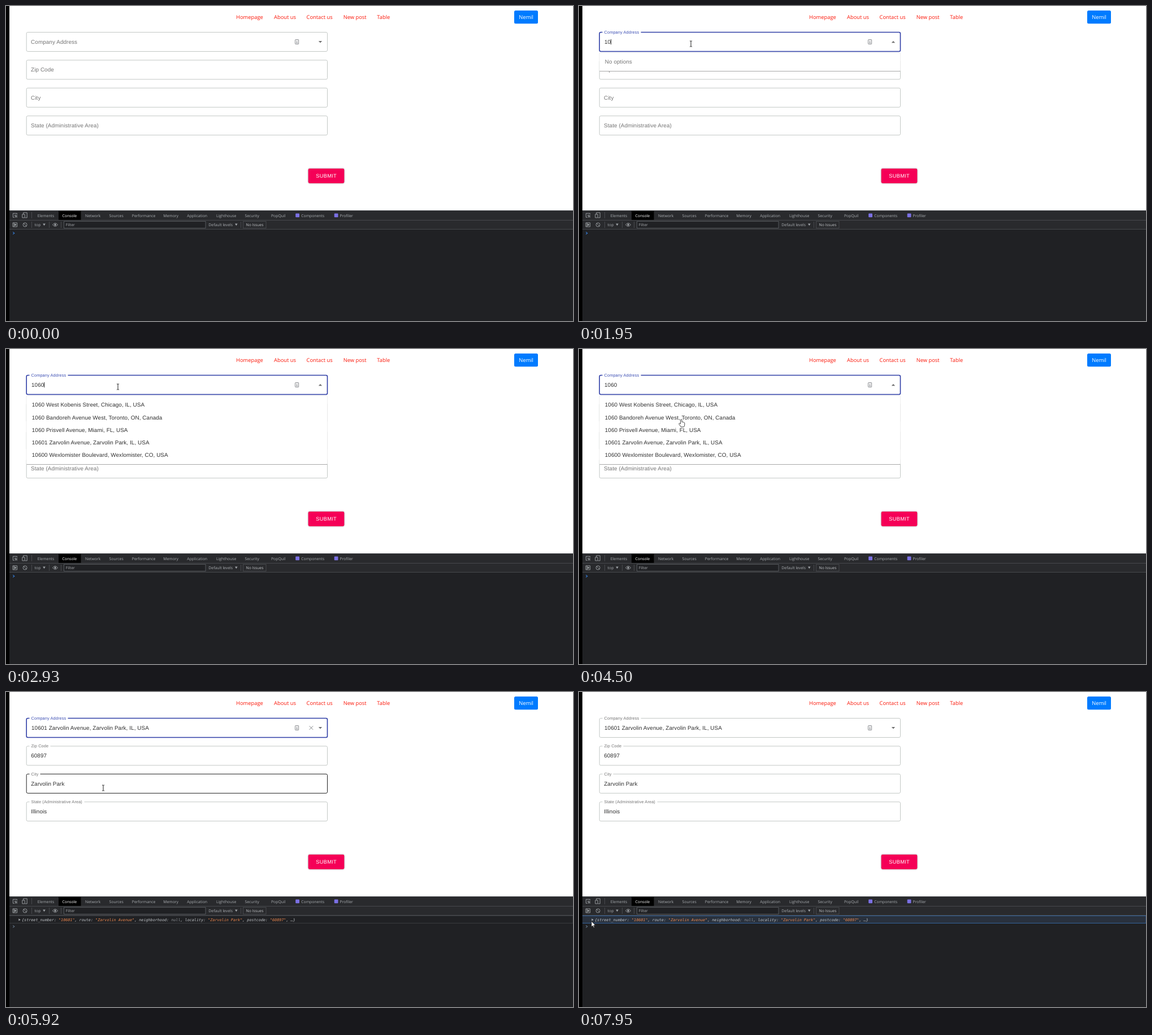
Write an HTML page that moves like this. It is 1003x558 px and loops after 8 s.

```html
<!DOCTYPE html>
<html lang="en">
<head>
<meta charset="utf-8">
<title>Address form</title>
<style>
  html, body { margin: 0; width: 1003px; height: 558px; overflow: hidden; background: #fff; }
  svg { display: block; }
  text { text-rendering: geometricPrecision; white-space: pre; }
  .nav { font: 9.35px "Open Sans", "Noto Sans", sans-serif; fill: #fb1a0c; }
  .form { font: 9.87px "Liberation Sans", Arial, sans-serif; letter-spacing: .0094em; fill: #303030; }
  .tool { font: 6.85px "Open Sans", "Noto Sans", sans-serif; fill: #a9adb1; }
  .log { font: italic 6.755px "DejaVu Sans Mono", monospace; fill: #c3c7cb; }
  .log .str { fill: #f0894f; }
  .log .nil { fill: #8d9196; }
  .icon { fill: none; stroke: #a0a4a8; stroke-width: .9; }
  .shadow { filter: drop-shadow(0 .9px .8px rgba(0, 0, 0, .45)); }
</style>
</head>
<body>
<svg id="stage" width="1003" height="558" viewBox="0 0 1003 558">
  <g id="page">
    <g id="nav" class="nav"></g>
    <rect x="899" y="8" width="42" height="23.2" rx="2.5" fill="#007bff"/>
    <text class="nav" x="920" y="23.4" text-anchor="middle" style="fill:#fff">Nemil</text>
    <g id="fields" class="form"></g>
    <rect id="caret" y="58.8" width=".9" height="9.4" fill="#111"/>
    <g fill="none" stroke="#74787c" stroke-width=".9">
      <rect x="511.6" y="59.6" width="6" height="7.8" rx=".6"/>
      <path d="M514.6 61.4v4.2M513.5 65.4h2.2"/>
      <path id="clear" d="M536.6 60.2l6.6 6.6M543.2 60.2l-6.6 6.6"/>
    </g>
    <path id="chevron" d="M-3.2-1.6h6.4L0 1.6z" fill="#6c6c6c"/>
    <g id="popup" class="form">
      <rect x="36" y="82.6" width="532.6" rx="2" fill="#fff" stroke="#e9e9e9" stroke-width=".8"/>
      <path id="edge" d="M36.5 0H568" stroke="#a8a8a8" stroke-width="1.1"/>
    </g>
    <rect class="shadow" x="534.7" y="288" width="63.6" height="26" rx="2.4" fill="#f50057"/>
    <text class="form" x="566.6" y="304.2" text-anchor="middle" style="fill:#fff;font-size:9.25px;letter-spacing:.0286em">SUBMIT</text>
  </g>
  <g id="devtools">
    <rect y="362" width="1003" height="196" fill="#202124"/>
    <rect y="362" width="1003" height="34" fill="#292a2d"/>
    <path d="M0 362.5H1003M0 379.5H1003M0 395.5H1003" stroke="#47494d"/>
    <rect x="93" y="363" width="39.5" height="16" fill="#000"/>
    <path d="M45.5 365v11M45.5 382v11M76.5 382v11M97.5 382v11M415.5 382v11" stroke="#47494d"/>
    <g class="icon">
      <path d="M15 374.3h-2.6v-7h7v2.2M15.6 370l4.4 1.8-1.8.8 1.6 2.2M15.6 370l1.4 4.4.9-1.7"/>
      <path d="M30.6 369v-3h6.6v9h-3.4M28.8 369h4.4v6h-4.4z"/>
      <path d="M12 384h7.6v7h-7.6zM14 384v7"/>
      <path d="M15.6 385.8l2.6 1.7-2.6 1.7z" fill="#a0a4a8"/>
      <circle cx="33.6" cy="387.5" r="3.5"/>
      <path d="M31.2 385l4.9 5M82.4 387.5q4.6-5.6 9.2 0q-4.6 5.6-9.2 0z"/>
      <circle cx="87" cy="387.5" r="1.3" fill="#a0a4a8"/>
    </g>
    <g fill="#7b70e4">
      <rect x="512.2" y="367.5" width="6.8" height="6.8" rx="1"/>
      <rect x="580.7" y="367.5" width="6.8" height="6.8" rx="1"/>
    </g>
    <rect x="102.5" y="381.5" width="250.5" height="12" fill="#202124" stroke="#55585c"/>
    <rect x="419.5" y="381.5" width="40.5" height="12" fill="none" stroke="#47494d"/>
    <path d="M65.2 385.6h4.6l-2.3 3.6zM405 385.6h4.6l-2.3 3.6z" fill="#a0a4a8"/>
    <g id="tools" class="tool"></g>
    <g id="log">
      <rect id="row" x="0" y="396.5" width="1003" height="13"/>
      <path d="M22.4 401.2v4.4l3.4-2.2z" fill="#a4a8ac"/>
      <text class="log" x="28" y="405.6">{street_number: <tspan class="str">"10601"</tspan>, route: <tspan class="str">"Zarvolin Avenue"</tspan>, neighborhood: <tspan class="nil">null</tspan>, locality: <tspan class="str">"Zarvolin Park"</tspan>, postcode: <tspan class="str">"60897"</tspan>, …}</text>
    </g>
    <path id="prompt" d="M12.2-2l2.6 2-2.6 2" fill="none" stroke-width="1.1"/>
  </g>
  <rect width="6" height="558" fill="#000"/>
  <path id="cursor" stroke-linejoin="round"/>
</svg>
<script>
const LOOP = 8000;
const $ = id => document.getElementById(id);
const svg = (tag, attrs, parent, text = '') => {
  const el = document.createElementNS('http://www.w3.org/2000/svg', tag);
  set(el, attrs);
  el.textContent = text;
  return parent.appendChild(el);
};
function set(el, attrs) {
  for (const k in attrs) el.setAttribute(k, attrs[k]);
}
const show = (el, on) => { el.style.display = on ? '' : 'none'; };
const mix = (a, b, u) => a + (b - a) * u;

// Static text rows
const row = (parent, y, items) => {
  for (const [x, s, fill] of items) svg('text', { x, y, style: fill ? 'fill:' + fill : '' }, parent, s);
};
row($('nav'), 23.4, [[407, 'Homepage'], [474, 'About us'], [531.5, 'Contact us'], [596.7, 'New post'], [656.3, 'Table']]);
row($('tools'), 373.5, [
  [55.8, 'Elements'], [99.5, 'Console', '#fff'], [140, 'Network'], [182.6, 'Sources'],
  [222.8, 'Performance'], [278.3, 'Memory'], [320.3, 'Application'], [372, 'Lighthouse'],
  [422.5, 'Security'], [469, 'PopQuil'], [522.2, 'Components'], [590.6, 'Profiler']
]);
row($('tools'), 390, [
  [50.6, 'top'], [105.8, 'Filter'], [358.3, 'Default levels'], [424.6, 'No Issues', '#c4c7ca']
]);

// Form
const ADDRESS = '10601 Zarvolin Avenue, Zarvolin Park, IL, USA';
const FOCUS = 1240, OPEN = 1320, PICK = 5230, LOG = 5540, FILL = 5690, BLUR = 7600;
const TYPED = [[1870, '1'], [1950, '10'], [2470, '106'], [2550, '1060'], [PICK, ADDRESS]];
const CARET_RESETS = [1330, 1870, 1950, 2470, 2550, 5375];

const fields = [
  ['Company Address', '', 62, FOCUS],
  ['Zip Code', '60897', 31, FILL],
  ['City', 'Zarvolin Park', 13, FILL],
  ['State (Administrative Area)', 'Illinois', 91, FILL]
].map(([label, value, width, lift], i) => {
  const y = 46.5 + 49.4 * i, g = $('fields');
  return {
    y, lift, value, width,
    box: svg('rect', { x: 36.2, y, width: 532.3, height: 34, rx: 2.4, fill: 'none' }, g),
    notch: svg('rect', { x: 41.5, y: y - 2, height: 4, fill: '#fff' }, g),
    label: svg('text', {}, g, label),
    input: svg('text', { x: i ? 44.2 : 45, y: y + 20.3 }, g)
  };
});

const lists = [
  [OPEN, ['No options']],
  [2160, ['10 Velmora Street, Chicago, IL, USA', '10 South Quendal Avenue, Chicago, IL, USA',
    '100 Harnova Drive, Toronto, ON, Canada', '1000 Lisgrove Avenue, Miami, FL, USA',
    '10 West Ombrel Street, Chicago, IL, USA']],
  [2930, ['1060 West Kobenis Street, Chicago, IL, USA', '1060 Bandoreh Avenue West, Toronto, ON, Canada',
    '1060 Prisvell Avenue, Miami, FL, USA', ADDRESS, '10600 Wexlomister Boulevard, Wexlomister, CO, USA']]
];
const popup = $('popup'), sheet = popup.querySelector('rect'), TOP = 82.6;
const options = [0, 1, 2, 3, 4].map(i => svg('text', { x: 45.8, y: 102.3 + 22.2 * i }, popup));

// Pointer moves: start, steps, step length, from, to, ease-out power for x and y
const MOVES = [
  [380, 11, 78, [668, 380], [198, 67], [2.26, 2.04]],
  [4030, 10, 82, [197, 70], [171, 157], [1.2, 1.2]],
  [4850, 2, 78, [171.5, 165], [172, 170], [1, 1]],
  [6470, 11, 77, [170, 178], [29, 422], [2.02, 4.5]],
  [7310, 5, 78, [28, 418], [22, 408.5], [1.2, 1.2]],
  [7950, 1, 50, [22, 406], [22, 406], [1, 1]]
];
const SHAPES = {
  arrow: 'M0 0V10L2.3 7.9 3.9 11.4 5.4 10.8 3.9 7.4H7Z',
  hand: 'M-1.2 1.2Q0-.6 1.2 1.2V5.2Q2.6 4.4 3.2 5.6Q4.6 5 5 6.3Q6 6 6 7.4V10Q6 12 4.8 13.8H-.6Q-1.6 12-3.6 9.4Q-4.6 7.6-3.4 7.4Q-2.4 7.2-1.2 8.6Z',
  beam: 'M-2-5H-.6L0-4.4 .6-5H2M0-4.4V4.4M-2 5H-.6L0 4.4 .6 5H2'
};
const last = (rows, t) => rows.filter(r => r[0] <= t).pop();

function pointer(t) {
  const move = last(MOVES, t);
  if (!move) return null;
  const [start, steps, dt, from, to, power] = move;
  const k = Math.min(steps - 1, Math.floor((t - start) / dt));
  const u = steps > 1 ? k / (steps - 1) : 1;
  return [0, 1].map(i => to[i] + (from[i] - to[i]) * (1 - u) ** power[i]);
}

function drawCursor(t, p, hovered, onList) {
  const el = $('cursor');
  show(el, p);
  if (!p) return;
  const [x, y] = p, dark = y > 396;
  let shape = 'arrow';
  if (onList || (t >= PICK && t < FILL)) shape = 'hand';
  else if (hovered || (dark && y > 410)) shape = 'beam';
  const beam = shape === 'beam';
  set(el, {
    d: SHAPES[shape], transform: `translate(${x} ${y})`,
    fill: beam ? 'none' : '#fff', stroke: beam && dark ? '#e8e8e8' : '#1c1c1c', 'stroke-width': beam ? 1 : .8
  });
}

function draw(t) {
  const open = t >= OPEN && t < PICK, focused = t >= FOCUS && t < BLUR;
  const list = open ? last(lists, t)[1] : [];
  const height = list.length > 1 ? 121.9 : 32.9;
  const p = pointer(t);
  const onList = !!p && open && p[1] > TOP && p[1] < TOP + height;
  const hovered = p && !onList && fields.find(f => p[0] > 36 && p[0] < 569 && p[1] > f.y && p[1] < f.y + 34);

  fields.forEach((f, i) => {
    const active = !i && focused;
    const u = Math.min(1, Math.max(0, (t - f.lift) / 200)), e = 1 - (1 - u) ** 3;
    set(f.box, {
      stroke: active ? '#2f3ea6' : f === hovered ? '#212121' : '#c3c8c5',
      'stroke-width': active ? 1.6 : 1
    });
    set(f.notch, { width: u > 0 ? (f.width + 6) * Math.min(1, e * 1.5) : 0 });
    set(f.label, {
      x: mix(44.1, 44.5, e), y: f.y + mix(20.3, 2.2, e),
      style: `font-size:${mix(9.87, 7.4, e)}px;fill:${active ? '#3f51b5' : '#757575'}`
    });
    f.input.textContent = i ? (t >= FILL ? f.value : '') : (last(TYPED, t) || [0, ''])[1];
  });

  const reset = CARET_RESETS.filter(r => r <= t).pop();
  const blinkOn = reset === undefined || Math.floor(Math.max(0, t - reset - 15) / 530) % 2 === 0;
  show($('caret'), focused && blinkOn);
  const input = fields[0].input;
  set($('caret'), { x: 45 + (input.textContent ? input.getComputedTextLength() : 0) });
  show($('clear'), t >= PICK && t < BLUR);
  set($('chevron'), { transform: `translate(556 63.6) scale(1 ${open ? -1 : 1})` });

  show(popup, open);
  set(sheet, { height });
  set($('edge'), { transform: `translate(0 ${TOP + height})` });
  options.forEach((o, i) => {
    o.textContent = list[i] || '';
    o.style.fill = list.length > 1 ? '' : '#757575';
  });

  const logged = t >= LOG, selected = t >= BLUR;
  show($('log'), logged);
  set($('row'), { fill: selected ? '#29313d' : '#202124', stroke: selected ? '#34629c' : '#393b3f' });
  set($('prompt'), { transform: `translate(0 ${logged ? 415.4 : 402.4})`, stroke: logged ? '#66788c' : '#3884e4' });
  drawCursor(t, p, hovered, onList);
}

const begin = performance.now();
function tick() {
  draw((performance.now() - begin) % LOOP);
  requestAnimationFrame(tick);
}
tick();
</script>
</body>
</html>
```
